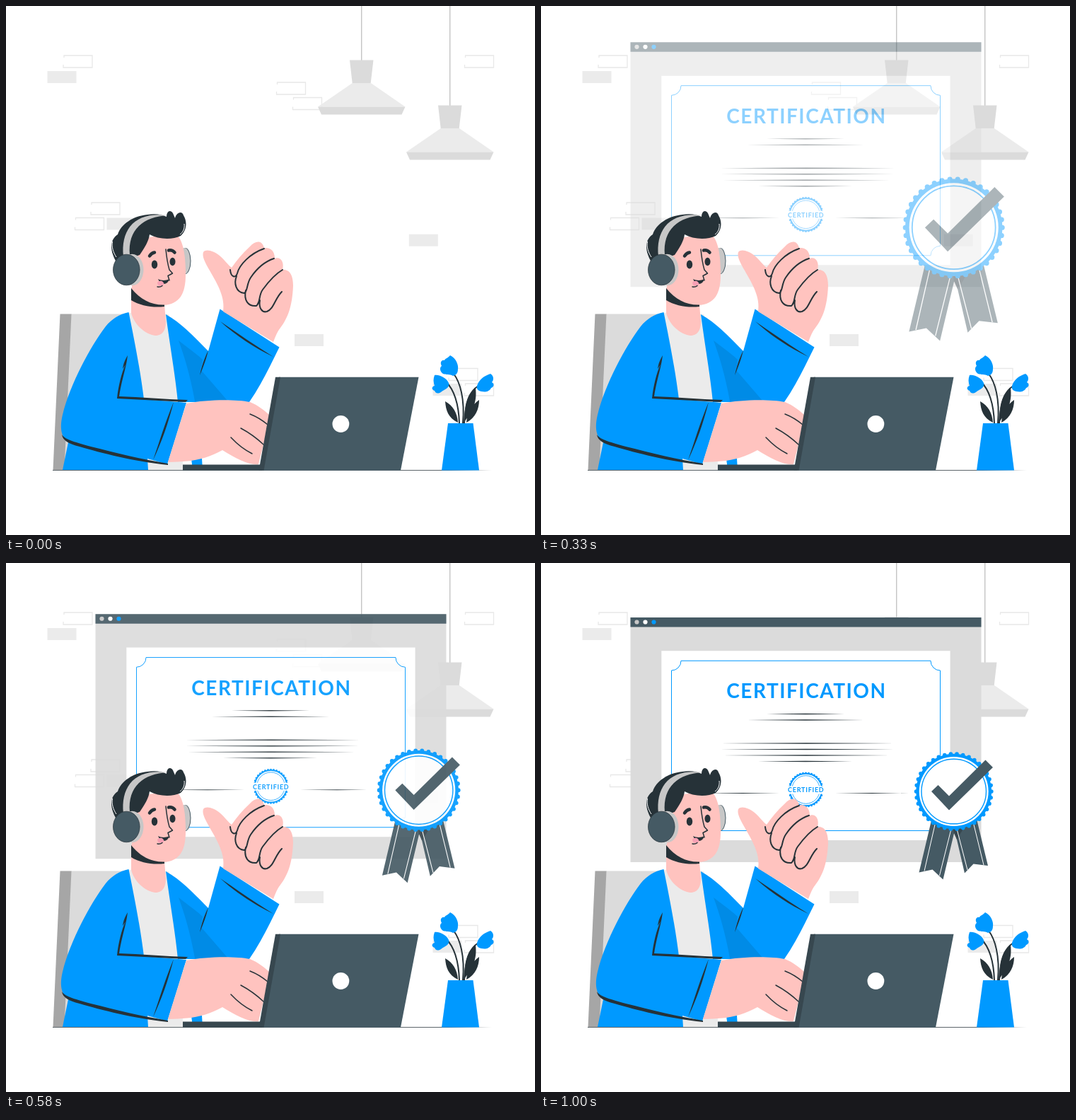
These frames come from a looping animation (748x748 px, 1.04 s). An HTML page without scripts:

```html
<!DOCTYPE html>
<html lang="en">
<head>
<meta charset="utf-8">
<title>Online certification</title>
<style>
@property --p { syntax: "<number>"; inherits: true; initial-value: 0; }
html, body { margin: 0; width: 100%; height: 100%; overflow: hidden; background: #fff; }
svg { display: block; width: 100vw; height: 100vh; }

/* --p eases from 0 to 1 with a small overshoot, held at 24 poses a second */
.reveal {
  animation-name: reveal;
  animation-duration: 1040ms;
  animation-delay: -4ms;
  animation-iteration-count: infinite;
  animation-timing-function: step-end;
}
@keyframes reveal {
  0% { --p: 0 } 8% { --p: .045 } 12% { --p: .088 } 16% { --p: .136 }
  20% { --p: .205 } 24% { --p: .283 } 28% { --p: .362 } 32% { --p: .445 }
  36% { --p: .532 } 40% { --p: .618 } 44% { --p: .7 } 48% { --p: .778 }
  52% { --p: .848 } 56% { --p: .91 } 60% { --p: .96 } 64% { --p: 1 }
  68% { --p: 1.035 } 72% { --p: 1.056 } 76% { --p: 1.064 } 80% { --p: 1.066 }
  84% { --p: 1.062 } 88% { --p: 1.05 } 92% { --p: 1.034 } 96%, 100% { --p: 1.015 }
}
.window { opacity: var(--p); transform: translateY(calc(var(--p) * 45px - 45.7px)); }
.badge {
  opacity: var(--p);
  transform-origin: 583.7px 357px;
  transform: scale(calc(1.511 - .504 * var(--p)));
}

text { font-family: Lato, "Open Sans", sans-serif; font-weight: 700; text-anchor: middle; fill: #09f; }
.blue { fill: #09f; }
.ink { fill: #263238; }
.slate { fill: #455a64; }
.deep { fill: #37474f; }
.pale { fill: #ebebeb; }
.grey { fill: #dbdbdb; }
.steel { fill: #c7c7c7; }
.skin { fill: #ffc3bf; }
.white { fill: #fff; }
.line { fill: none; stroke: #263238; stroke-width: 2; stroke-linecap: round; stroke-linejoin: round; }
.fine { stroke-width: 1.5; }
.bold { stroke-width: 4.5; }
.thin { fill: none; stroke: #09f; }
</style>
</head>
<body>
<svg viewBox="0 0 748 748">
  <defs>
    <path id="brick" d="M0 13V17H41V0H1V3" fill="none" stroke="#e8e8e8" stroke-width="1.3"/>
    <rect id="block" width="41" height="17" class="pale"/>
    <g id="lamp">
      <path d="M502.7-70V77" stroke="#c4c4c4" stroke-width="1.4"/>
      <path class="grey" d="M486 76.5H519.5L515.7 109H489.7Z"/>
      <path class="pale" d="M489.7 109H516L564.5 142.5H441Z"/>
      <path class="grey" d="M441 142.5H564.5L559.5 153.5H446Z"/>
    </g>
    <linearGradient id="fade">
      <stop offset=".9" stop-color="#263238"/>
      <stop offset="1" stop-color="#263238" stop-opacity="0"/>
    </linearGradient>
  </defs>

  <!-- wall -->
  <use href="#brick" x="81" y="70"/>
  <use href="#brick" x="382.5" y="108"/>
  <use href="#brick" x="405.5" y="129.5"/>
  <use href="#brick" x="648.5" y="70"/>
  <use href="#brick" x="120" y="278"/>
  <use href="#brick" x="97.5" y="299.5"/>
  <use href="#brick" x="626" y="512.5"/>
  <use href="#brick" x="648.5" y="534"/>
  <use href="#block" x="58.5" y="92"/>
  <use href="#block" x="142.5" y="299.5"/>
  <use href="#block" x="569.8" y="322.7"/>
  <use href="#block" x="408" y="464"/>
  <use href="#block" x="603.5" y="534"/>
  <use href="#lamp"/>
  <use href="#lamp" x="125" y="64"/>

  <g class="reveal">
    <g class="window">
      <path class="grey" d="M126.5 77H622.5V423H126.5Z"/>
      <path class="slate" d="M126.5 77H622.5V90.5H126.5Z"/>
      <circle cx="135.5" cy="83.5" r="3.1" class="steel"/>
      <circle cx="147.5" cy="83.5" r="3.1" class="white"/>
      <circle cx="159.5" cy="83.5" r="3.1" class="blue"/>
      <path class="white" d="M170.3 124.3H578.6V392H170.3Z"/>
      <path class="thin" d="M198 138.3H551A13.5 13.5 0 0 0 564.5 152V365A13.5 13.5 0 0 0 551 378.5H198A13.5 13.5 0 0 0 184.5 365V152A13.5 13.5 0 0 0 198 138.3Z"/>
      <text x="375.4" y="191.3" font-size="28" letter-spacing="1.5">CERTIFICATION</text>
      <path class="ink" d="M319 213.5L374 212.8 429 213.5 374 214.2ZM291 222L374 221.3 457 222 374 222.7ZM250 255L375 254.2 500 255 375 255.8ZM250 263.5L375 262.8 499 263.5 375 264.3ZM257 272L375 271.3 493 272 375 272.8ZM307 280.5L374 279.8 440 280.5 374 281.2ZM233 325.5L285 325 337 325.5 285 326ZM416 325.5L468 325 520 325.5 468 326Z"/>
      <g class="thin">
        <circle cx="374.5" cy="320.5" r="22.8" stroke-width="2"/>
        <circle cx="374.5" cy="320.5" r="23.6" stroke-width="3" stroke-linecap="round" pathLength="36" stroke-dasharray="0 1"/>
        <circle cx="374.5" cy="320.5" r="19.8" stroke-width=".8"/>
      </g>
      <path class="white" d="M347 315.5H402V326.5H347Z"/>
      <text x="374.8" y="324.4" font-size="9" letter-spacing=".75">CERTIFIED</text>
    </g>

    <g class="badge">
      <path class="slate" d="M584 374L599 438.5 611.5 425.5 632 428 616 362Z"/>
      <path class="slate" d="M552 364L534.5 437.5 553.5 433.5 568.5 447.5 586 374Z"/>
      <path class="deep" d="M583 376H597L588 391 584 382Z"/>
      <path d="M557 370L542 435.5M580 376L563.5 442M588 376L603 434M611 366L626 427" stroke="#fff"/>
      <circle cx="583.7" cy="323" r="53.4" class="blue"/>
      <circle cx="583.7" cy="323" r="53.2" class="thin" stroke-width="5.6" stroke-linecap="round" pathLength="38" stroke-dasharray="0 1"/>
      <circle cx="583.7" cy="323" r="49" class="white"/>
      <circle cx="583.7" cy="323" r="45.8" class="thin" stroke-width="1.4"/>
      <path class="slate" d="M552 323L561.5 314 577 329.5 628.5 278.5 639 289 577 349.5Z"/>
    </g>
  </g>

  <!-- chair -->
  <path class="grey" d="M92 435.5H180V656H81Z"/>
  <path fill="#a6a6a6" d="M76.5 435.5H92.5L82.5 656H66.5Z"/>
  <path d="M66 656.2H687V656.9H66Z" fill="url(#fade)"/>

  <!-- body -->
  <path class="pale" d="M172 434L230 436 250 560V656H200L190 560Z"/>
  <path class="blue" d="M226 436C248 448 268 470 286 488L302.5 428.5 386.5 482.5C372 512 360 537 344 560H243C239 520 231 475 226 436Z"/>
  <path d="M244 473C258 484 270 492 278 500L276 515 314 559H267C262 530 254 500 244 473Z" fill="#008be6"/>
  <path class="blue" d="M262 640H277L278 656H264Z"/>
  <path class="skin" d="M177 398V434C181 450 196 464 211 466C223 466 226 456 226 446L224 422Z"/>
  <path class="blue" d="M173.5 433C160 436 150 442 141 453C118 483 89 539 80 578C76 595 77 609 88 617L80 656H201L200 640 228 648 255 561 195 556C190 515 181 470 173.5 433Z"/>
  <path class="ink" d="M286 487C283 500 279 510 274 522C277 508 281 497 286 487ZM303 446C328 463 352 480 378 496C351 483 326 467 303 446Z"/>
  <path class="ink" d="M172 494C170 512 163 530 160 552C190 553 225 556 257 557L254 560C222 558 190 557 157 555C159 536 164 517 169 507L165 513C166 505 169 499 172 494Z"/>
  <path class="ink" d="M79 606C84 614 100 617 120 623C156 632 192 641 229 647V649C180 644 135 632 104 623C88 619 80 614 79 606ZM237 560C230 588 220 617 208 642C217 616 226 586 237 560Z"/>

  <!-- raised hand -->
  <path class="skin" d="M307 432C310 412 300 395 288 374C281 362 277 354 279 348C283 343 293 346 302 353C310 360 314 366 319 370C326 360 334 350 345 340C352 332 362 330 365 342C374 341 380 346 380 357C388 354 394 362 391 373C402 372 406 382 406 395C405 425 398 442 388 455C382 463 381 468 378 475Z"/>
  <path class="line" d="M317 373C318 384 325 385 327 378C330 366 345 350 365 343M326 382C322 392 325 405 337 406C342 403 340 393 346 384C354 372 364 362 379 357M339 402C336 416 342 425 354 424C360 419 357 409 363 401C371 390 379 380 391 373M359 416C357 427 362 434 369 432C379 428 380 414 390 404"/>

  <!-- head -->
  <ellipse cx="253.5" cy="360.5" rx="8" ry="18.5" class="slate"/>
  <ellipse cx="252.5" cy="360.5" rx="8" ry="18.5" class="steel"/>
  <path class="skin" d="M178 330L240 322C250 330 254 350 254 380C254 406 246 422 222 423C200 422 184 414 178 400Z"/>
  <path class="ink" d="M177 399V416C190 424 208 427 224 425V422.5C205 423 190 415 177 399Z"/>
  <path class="ink" d="M156 362C146 345 147 330 158 323C163 308 180 297 200 295C212 293 220 295 227 298C227 291 232 287 236 293L239 300C241 292 249 289 251 296C257 306 255 318 247 325C235 331 215 330 203 323C202 332 196 342 189 352L160 362Z"/>
  <path d="M150.5 333C149 341 152 349 156 355M252 308C253 315 250 320 246 323" fill="none" stroke="#fff"/>
  <path class="steel" d="M166 354C162 316 182 290 229 296C194 298 172 316 175 352Z"/>
  <ellipse cx="178.5" cy="373" rx="16" ry="22.3" class="steel"/>
  <ellipse cx="170.3" cy="373" rx="18.8" ry="21.8" class="slate" stroke="#263238" stroke-width=".7"/>
  <ellipse cx="210" cy="365.5" rx="4.2" ry="6" class="ink"/>
  <ellipse cx="235.5" cy="361.5" rx="4" ry="5.8" class="ink"/>
  <path class="line bold" d="M203 353.5Q206 349 210 348.5M230 345.5Q235 344.5 238.5 348.5"/>
  <path class="line fine" d="M226 344C227 355 229 366 231 373L235.5 378 229 381.5 231 388"/>
  <path class="ink" d="M215 386C221 389 226 388 230.5 386.5C229 393 223 395 217 390Z"/>
  <path d="M214 391C217 387 224 389 223 394C219 397 214 396 214 391Z" fill="#f7a0b4"/>
  <path class="line fine" d="M214 397Q218 398 221 395.5"/>

  <!-- typing hand -->
  <path class="skin" d="M255 562C285 556 325 556 345 560C357 565 366 572 374 580L357 648C345 650 325 640 306 628C285 640 262 645 229 645Z"/>
  <path class="line fine" d="M345 577Q358 582 370 592M332 597Q349 606 364 620M318 610Q332 625 348 633"/>

  <!-- laptop -->
  <path class="deep" d="M250 648.5H362V656.8H250Z"/>
  <path class="slate" d="M386 524.7H583.5L558 656.8H363Z"/>
  <path class="deep" d="M381 524.7H388L364.5 656.8H357.5Z"/>
  <circle cx="473.4" cy="591" r="11.9" class="white"/>

  <!-- plant -->
  <path class="line" d="M641 590C640 560 632 541 622 531M646 590C649 555 642 532 633 520M648 590C650 560 655 545 668 537"/>
  <path class="ink" d="M639 589C625 582 622 572 621 559C632 565 638 575 639 589ZM648 588C648 565 652 548 664 540C666 558 662 570 648 588ZM651 589C652 575 658 565 669 557C669 570 664 582 651 589Z"/>
  <g class="blue">
    <path d="M606 522C612 521 622 525 626 533C628 540 620 542 615 546C610 549 607 547 606 544C601 542 602 538 606 537C604 532 604 527 606 522Z"/>
    <path d="M628 494C635 497 640 506 639 513C639 520 636 522 632 523C627 520 622 522 618 520C613 517 613 511 616 509C613 504 616 500 620 501C621 498 625 498 628 494Z"/>
    <path d="M685 520C690 523 690 529 687 532C691 534 690 539 686 540C683 546 677 546 672 545C667 544 665 541 666 537C669 528 676 523 685 520Z"/>
    <path d="M625 590H660.5L669 656.5H616Z"/>
  </g>
</svg>
</body>
</html>
```
